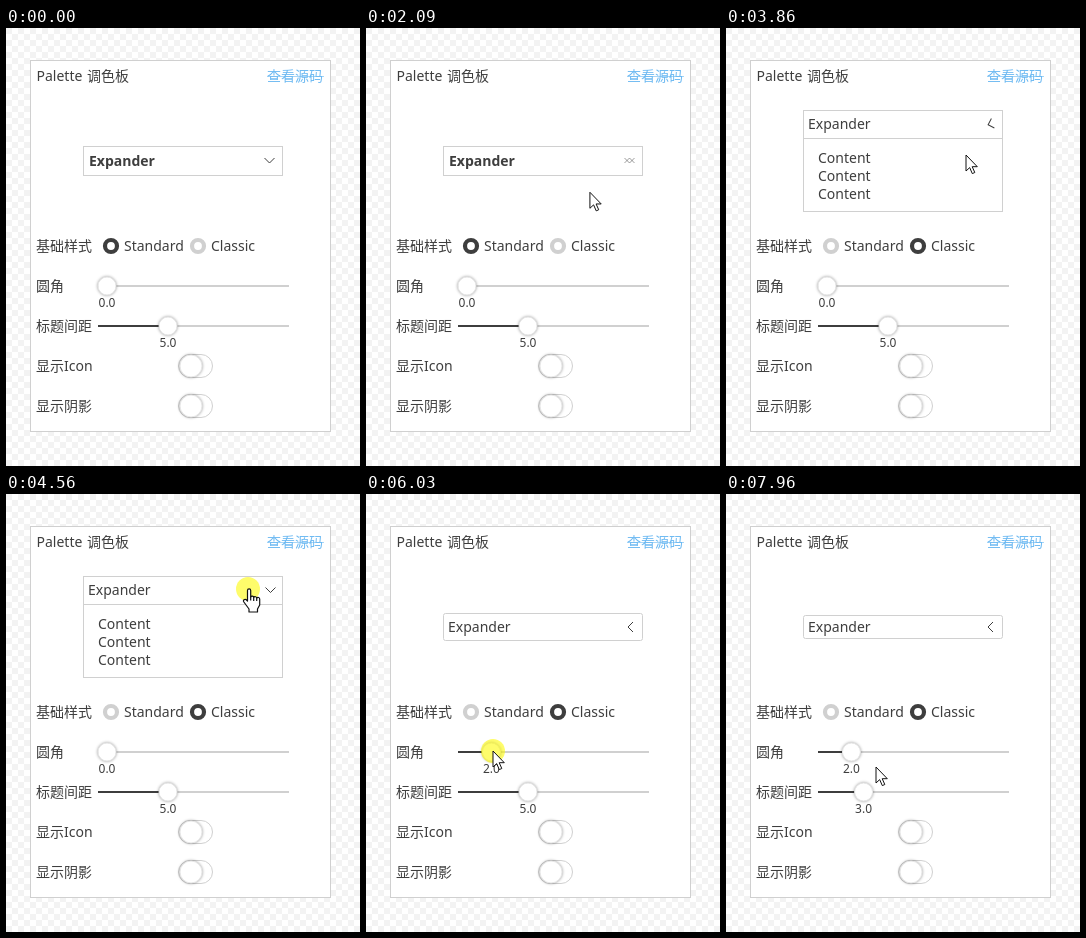
An HTML page that plays this animation: 354 by 438 pixels, repeating every 8 s.

```html
<!DOCTYPE html>
<html lang="zh">
<head>
<meta charset="utf-8">
<style>
html, body { margin: 0; width: 100%; height: 100%; overflow: hidden; }
svg { display: block; font: 14px "Noto Sans", "Noto Sans CJK SC", "Noto Sans CJK", sans-serif; fill: #3e3e3e; }
.line { fill: none; stroke: #3e3e3e; }
.box { fill: #fff; stroke: #d0d0d0; }
.knob { fill: #fff; stroke: #e6e6e6; filter: drop-shadow(0 0 1.5px #0006); }
.radio { fill: #fff; stroke-width: 4.2; }
.value { font-size: 12px; text-anchor: middle; }
.pointer { fill: #fff; stroke: #111; stroke-linejoin: round; }
</style>
</head>
<body>
<svg width="354" height="438" viewBox="0 0 354 438">
  <defs>
    <pattern id="checker" width="12" height="12" patternUnits="userSpaceOnUse">
      <path d="M0 0H6V12H12V6H0Z" fill="#f3f3f3"/>
    </pattern>
    <g id="toggle">
      <rect class="box" x="172.5" y="-11.5" width="34" height="23" rx="11.5"/>
      <circle class="knob" cx="185" r="11"/>
    </g>
  </defs>
  <rect width="354" height="438" fill="#fff"/>
  <rect width="354" height="438" fill="url(#checker)"/>
  <rect class="box" x="24.5" y="32.5" width="300" height="371"/>

  <text x="30.5" y="53" word-spacing="1">Palette 调色板</text>
  <text x="261" y="53" fill="#6cb9f2">查看源码</text>
  <path d="M261 48.5H318" stroke="#6cb9f2" stroke-opacity=".6"/>
  <text x="30" y="223">基础样式</text>
  <text x="118" y="223">Standard</text>
  <text x="205" y="223">Classic</text>
  <text x="30" y="263">圆角</text>
  <text x="30" y="303">标题间距</text>
  <text x="30" y="343">显示Icon</text>
  <text x="30" y="383">显示阴影</text>
  <circle id="standard" class="radio" cx="105" cy="218" r="6"/>
  <circle id="classic" class="radio" cx="192" cy="218" r="6"/>
  <use href="#toggle" y="338"/>
  <use href="#toggle" y="378"/>

  <rect id="frame" class="box" x="77.5" width="199"/>
  <path id="divider" d="M78 110.5H276" stroke="#d0d0d0"/>
  <g id="header">
    <text id="title" y="5">Expander</text>
    <path id="down" class="line" d="M-5 -2.5L0 2.5L5 -2.5"/>
    <path id="up" class="line" d="M-5 2.5L0 -2.5L5 2.5"/>
  </g>
  <g id="content">
    <text>Content</text>
    <text y="18">Content</text>
    <text y="35.5">Content</text>
  </g>

  <g id="corner" transform="translate(0 258)"></g>
  <g id="spacing" transform="translate(0 298)"></g>

  <circle id="highlight" r="12" fill="#fdf900" fill-opacity=".58"/>
  <path id="arrow" class="pointer" d="M0 0V16L3.7 12.6L6.3 18.6L8.8 17.5L6.2 11.7H11.3Z"/>
  <g id="hand" class="pointer" stroke-width="1.2">
    <path d="M-.5 1.5a1.6 1.6 0 0 1 3.2 0V8a1.6 1.6 0 0 1 3 .5a1.6 1.6 0 0 1 3 .8a1.6 1.6 0 0 1 3 .8V16L9.5 20V23H1V20L-4.5 12.5a1.7 1.7 0 0 1 2.4-2L-.5 12Z"/>
    <path d="M2.7 7.5V11.5M5.7 8.5V12M8.7 9.3V12" fill="none"/>
  </g>
</svg>
<script>
const $ = id => document.getElementById(id);
const set = (el, attrs) => { for (const key in attrs) el.setAttribute(key, attrs[key]); };
const show = (id, on) => set($(id), { visibility: on ? 'visible' : 'hidden' });
const progress = (t, start, length) => Math.min(1, Math.max(0, (t - start) / length));
const easeOut = k => k * (2 - k);

const LOOP = 8000, UNIT = 12.2, DARK = '#3e3e3e', PALE = '#d0d0d0';
const press = (down, up) => ({ down, up });
const open = press(540, 690), close = press(1860, 1980);
const restyle = press(2630, 2800);
const reopen = press(3590, 3790), reclose = press(4480, 4710);
const dragCorner = press(5660, 6260), dragSpacing = press(7430, 7820);
const presses = [open, close, restyle, reopen, reclose, dragCorner, dragSpacing];
const held = (t, p) => t >= p.down && t < p.up;

// Each move eases the pointer from where it rests to x, y
const move = (start, length, x, y) => ({ start, length, x, y });
const ENTER = 70, entry = { x: 230, y: 333 };
const moves = [
  move(ENTER, 410, 216, 134),
  move(1170, 530, 254, 95),
  move(1930, 470, 201, 217),
  move(3090, 310, 240, 127),
  move(4250, 170, 242, 95),
  move(4640, 760, 103, 257),
  move(dragCorner.down, 350, 127, 257),
  move(6220, 1040, 163, 298),
  move(dragSpacing.down, 220, 144, 294),
  move(7760, 200, 150, 273)
];

function pointerAt(t) {
  let { x, y } = entry;
  for (const m of moves) {
    const k = easeOut(progress(t, m.start, m.length));
    x += (m.x - x) * k;
    y += (m.y - y) * k;
  }
  return { x, y };
}

function dragged(t, { down, up }) {
  const end = Math.min(Math.max(t, down), up - 60);
  return Math.round((pointerAt(end).x - pointerAt(down).x) / UNIT);
}

for (const id of ['corner', 'spacing']) $(id).innerHTML =
  `<path d="M92 0H283" stroke="${PALE}" stroke-width="2"/>
   <path class="line" stroke-width="2"/><circle class="knob" r="9"/><text class="value" y="21"/>`;

function drawSlider(id, value) {
  const x = 101 + value * UNIT;
  const [, fill, knob, label] = $(id).children;
  set(fill, { d: `M92 0H${x}` });
  set(knob, { cx: x });
  set(label, { x });
  label.textContent = value.toFixed(1);
}

function drawExpander(t, center, classic, isOpen, corner, spacing) {
  const height = isOpen ? (classic ? 102 : 103) : classic ? 18 + 2 * spacing : 30;
  set($('frame'), { y: 133.5 - height / 2, height: height - 1, rx: corner });
  show('divider', classic && isOpen);
  show('content', isOpen);
  set($('content'), { transform: classic ? 'translate(92 135)' : 'translate(93 134)' });
  set($('header'), { transform: `translate(0 ${center})` });
  set($('title'), { x: classic ? 82 : 83, 'font-weight': classic ? 400 : 700 });

  const turn = progress(t, reopen.up, 370) - progress(t, reclose.up, 350);
  const flip = classic ? 0 : progress(t, open.up + 70, 250) - progress(t, close.up, 220);
  set($('down'), {
    transform: classic ? `translate(264.5 0) rotate(${90 - 90 * turn})` : 'translate(263.5 -.5)',
    opacity: 1 - flip
  });
  set($('up'), { transform: 'translate(263.5 -.5)', opacity: flip });
}

function draw(t) {
  const classic = t >= restyle.up;
  const isOpen = t >= open.up && t < close.up || t >= reopen.up && t < reclose.up;
  const center = isOpen ? (classic ? 96 : 97) : 133;
  const corner = dragged(t, dragCorner);
  const spacing = 5 + dragged(t, dragSpacing);

  set($('standard'), { stroke: classic ? PALE : DARK });
  set($('classic'), { stroke: classic ? DARK : PALE });
  drawSlider('corner', corner);
  drawSlider('spacing', spacing);
  drawExpander(t, center, classic, isOpen, corner, spacing);

  const { x, y } = pointerAt(t);
  const overHeader = Math.abs(y - center) < 14;
  for (const id of ['highlight', 'arrow', 'hand']) set($(id), { transform: `translate(${x} ${y})` });
  show('highlight', presses.some(p => held(t, p)));
  show('arrow', t >= ENTER && !overHeader);
  show('hand', t >= ENTER && overHeader);
}

function tick() {
  draw(performance.now() % LOOP);
  requestAnimationFrame(tick);
}
tick();
</script>
</body>
</html>
```
